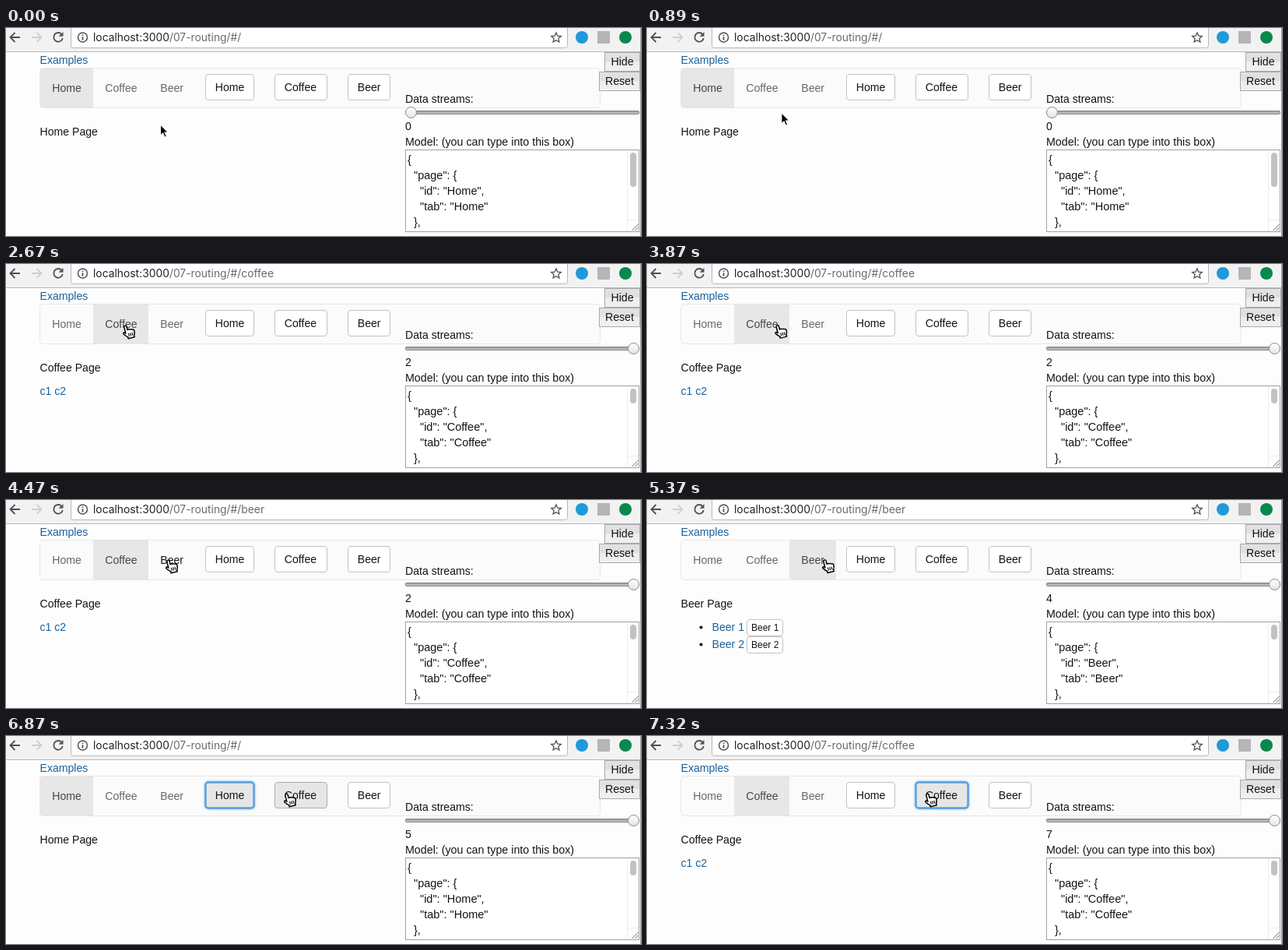
An HTML page for the animation above (8 s loop, 816 px wide and 267 px high).

```html
<!DOCTYPE html>
<html lang="en">
<head>
<meta charset="utf-8">
<title>Routing demo</title>
<style>
  html, body { margin: 0; width: 100%; height: 100%; overflow: hidden; background: #fdfdfd; }
  svg { display: block; font: 14.1px "Liberation Sans", Arial, sans-serif; fill: #141414; }
  text { white-space: pre; }
  .line { fill: none; stroke: #505050; stroke-width: 1.8; }
  .link { fill: #1a629c; }
  .button rect { fill: #fff; stroke: #c2c2c2; }
  .button.hover rect { fill: #e6e6e6; stroke: #adadad; }
  .button.focus rect { fill: #e6e6e6; stroke: #5a9fe0; stroke-width: 2.4; filter: drop-shadow(0 0 1.5px #66afe9); }
  .small { font-size: 12px; }
  .tab rect { fill: none; }
  .tab text { fill: #686868; }
  .tab.hover text { fill: #141414; }
  .tab.active rect { fill: #e7e7e7; }
  .tab.active text { fill: #464646; }
  .native rect { fill: url(#native); stroke: #a9a9a9; }
  .model { font-size: 14.5px; }
</style>
</head>
<body>
<svg width="816" height="267" viewBox="0 0 816 267">
  <defs>
    <linearGradient id="native" x2="0" y2="1">
      <stop stop-color="#e2e2e2"/><stop offset=".48" stop-color="#dfdfdf"/>
      <stop offset=".5" stop-color="#ededed"/><stop offset="1" stop-color="#f0f0f0"/>
    </linearGradient>
    <linearGradient id="track" x2="0" y2="1">
      <stop stop-color="#959595"/><stop offset="1" stop-color="#cfcfcf"/>
    </linearGradient>
    <linearGradient id="knob" x2="0" y2="1">
      <stop stop-color="#fff"/><stop offset="1" stop-color="#e4e4e4"/>
    </linearGradient>
  </defs>

  <!-- browser toolbar -->
  <rect width="816" height="30" fill="#f2f2f2"/>
  <rect x="83.5" y="-5.5" width="638" height="31" rx="3" fill="#fff" stroke="#b8b8b8"/>
  <path d="M0 30.5H816" stroke="#b9b9b9"/>
  <path class="line" d="M18 12H6M11.5 6L5.5 12L11.5 18"/>
  <path class="line" d="M33 12H45M39.5 6L45.5 12L39.5 18" style="stroke:#cfcfcf"/>
  <path class="line" d="M71.5 8A5.8 5.8 0 1 0 72.8 13"/>
  <path d="M73.5 5V10.8H67.7Z" fill="#505050"/>
  <circle class="line" cx="98.5" cy="12" r="6" style="stroke-width:1.5"/>
  <path class="line" d="M98.5 11.3V15.5M98.5 8.4V10"/>
  <text x="112" y="17" font-family="Inter, Roboto, sans-serif" font-size="13.85" fill="#6a6a6a"><tspan fill="#222">localhost:3000</tspan><tspan id="path"></tspan></text>
  <path class="line" style="stroke-width:1.3" d="M707 6L708.8 10.2L713.3 10.6L709.9 13.6L710.9 18L707 15.7L703.1 18L704.1 13.6L700.7 10.6L705.2 10.2Z"/>
  <circle cx="740" cy="12" r="8" fill="#1c9ad9"/>
  <rect x="760" y="4" width="16" height="16" fill="#b5b5b5"/>
  <circle cx="796" cy="12" r="8" fill="#07894c"/>

  <!-- navigation -->
  <text class="link" x="43.5" y="46">Examples</text>
  <rect x="43.5" y="51.5" width="720" height="51" rx="4" fill="#fbfbfb" stroke="#e7e7e7"/>
  <g id="nav"></g>

  <!-- pages -->
  <g id="pages">
    <text x="43.5" y="138">Home Page</text>
    <g><text x="43.5" y="138">Coffee Page</text><text class="link" x="43.5" y="168">c1 c2</text></g>
    <g id="beers"><text x="43.5" y="138">Beer Page</text></g>
  </g>

  <!-- developer panel -->
  <g class="native">
    <rect x="769.5" y="31.5" width="45" height="24"/><text x="777.5" y="48">Hide</text>
    <rect x="762.5" y="56.5" width="52" height="24"/><text x="770" y="73">Reset</text>
  </g>
  <text x="513" y="96">Data streams:</text>
  <rect x="513.5" y="106.5" width="300" height="4" rx="1" fill="url(#track)" stroke="#7c7c7c" stroke-width=".9"/>
  <circle id="thumb" cy="108.5" r="7" fill="url(#knob)" stroke="#8a8a8a"/>
  <text id="count" x="513" y="131"></text>
  <text x="513" y="151" font-size="14.25">Model: (you can type into this box)</text>
  <rect x="513.5" y="156.5" width="300" height="105" fill="#fff" stroke="#a0a0a0"/>
  <path d="M798.5 157V261M799 246.5H813" stroke="#ececec"/>
  <rect id="scroll" x="802" y="160" width="8" rx="4" fill="#c2c2c2"/>
  <path d="M804.5 260L812.5 252M808.5 260L812.5 256" stroke="#666"/>
  <g class="model">
    <text x="516" y="174">{</text>
    <text x="524" y="194">"page": {</text>
    <text id="modelId" x="532" y="214"></text>
    <text id="modelTab" x="532" y="234"></text>
    <text x="524" y="254">},</text>
  </g>
  <path d="M815.5 0V267" stroke="#9a9a9a"/>

  <!-- pointers, with the hot spot at 0,0 -->
  <path id="arrow" d="M0 0V14L3.2 11L5.5 16.3L7.9 15.2L5.6 10.1H10Z" fill="#000" stroke="#fff" stroke-width="1.1"/>
  <g id="hand">
    <g transform="translate(-1.3 -.3) rotate(-14) scale(1.1 1)" stroke="#000" stroke-width="1.4" fill="#fff" stroke-linejoin="round">
      <path d="M-1.5 9.5V1Q-1.5-.5 0-.5T1.5 1V5.5Q3 4.3 4 5.8Q5.8 5 6.5 6.6Q9 6.2 9 8.7Q9 12 7.5 14V16.5H0V14.7Q-2 12.5-4 9.7Q-4.7 8.2-3.5 7.7Q-2.3 7.7-1.5 9.5Z"/>
      <path d="M1.7 10V14M3.8 10V14M5.9 10V14" stroke-width="1"/>
    </g>
  </g>
</svg>
<script>
const LOOP = 8000;
const NAMES = ['Home', 'Coffee', 'Beer'];
const TABS = [[44, 68], [112, 71], [183, 60]];           // x, width
const BUTTONS = [[256.5, 62], [345.5, 67], [439.5, 54]];

const routes = [[0, ''], [2670, 'coffee'], [4470, 'beer'], [5970, ''], [7170, 'coffee']];
const pages = [[0, 0, 0], [2670, 1, 2], [4620, 2, 4], [6120, 0, 5], [7320, 1, 7]]; // time, page, count
const focuses = [[0, -1], [5970, 0], [7170, 1]];
// first step, last step, number of steps, destination
const moves = [
  [150, 1190, 8, 161, 102], [1340, 1780, 4, 154.5, 80], [3870, 4170, 3, 209.5, 78],
  [5370, 5670, 3, 286.5, 77], [6570, 6870, 3, 361.5, 75]
];

const $ = id => document.getElementById(id);
const show = (el, on) => el.style.display = on ? '' : 'none';
const latest = (list, t) => list.filter(entry => entry[0] <= t).pop();
const inside = ([x, w], top, bottom, p) => p.x >= x && p.x < x + w && p.y >= top && p.y < bottom;

const button = (x, y, w, h, label, pad, baseline, cls = '') =>
  `<g class="button ${cls}"><rect x="${x}" y="${y}" width="${w}" height="${h}" rx="3.5"/>` +
  `<text x="${x + pad}" y="${baseline}">${label}</text></g>`;

$('nav').innerHTML =
  TABS.map(([x, w], i) => `<g class="tab"><rect x="${x}" y="52" width="${w}" height="50"/>` +
    `<text x="${x + 15.3}" y="82">${NAMES[i]}</text></g>`).join('') +
  BUTTONS.map(([x, w], i) => button(x, 59.5, w, 33, NAMES[i], 12.3, 81)).join('');

$('beers').innerHTML += [1, 2].map(n => {
  const y = 146 + 22 * n;
  return `<circle cx="69.5" cy="${y - 4.5}" r="2.1"/><text class="link" x="83.5" y="${y}">Beer ${n}</text>` +
    button(128.5, y - 14.5, 46, 21, 'Beer ' + n, 5.5, y, 'small');
}).join('');

const tabs = document.querySelectorAll('.tab');
const buttons = document.querySelectorAll('#nav .button');

function pointerAt(t) {
  const p = { x: 198.5, y: 124 };
  for (const [start, end, steps, x, y] of moves) {
    if (t < start) break;
    const step = Math.floor((t - start) / (end - start) * (steps - 1) + 1e-6) + 1;
    const k = Math.min(1, step / steps), ease = k * k * (3 - 2 * k);
    p.x += (x - p.x) * ease;
    p.y += (y - p.y) * ease;
  }
  return p;
}

function draw(t) {
  const [, page, count] = latest(pages, t);
  const focus = latest(focuses, t)[1];
  const p = pointerAt(t);
  let overLink = false;

  tabs.forEach((tab, i) => {
    const hover = inside(TABS[i], 52, 102, p);
    overLink ||= hover;
    tab.classList.toggle('hover', hover);
    tab.classList.toggle('active', i === page);
  });
  buttons.forEach((el, i) => {
    const hover = inside(BUTTONS[i], 59, 93, p);
    overLink ||= hover;
    el.classList.toggle('hover', hover);
    el.classList.toggle('focus', i === focus);
  });
  [...$('pages').children].forEach((el, i) => show(el, i === page));

  $('path').textContent = '/07-routing/#/' + latest(routes, t)[1];
  $('count').textContent = count;
  $('modelId').textContent = `"id": "${NAMES[page]}",`;
  $('modelTab').textContent = `"tab": "${NAMES[page]}"`;
  $('thumb').setAttribute('cx', count ? 806.5 : 520.5);
  $('scroll').setAttribute('height', count ? 19 : 44);

  for (const id of ['arrow', 'hand']) {
    show($(id), overLink === (id === 'hand'));
    $(id).setAttribute('transform', `translate(${p.x} ${p.y})`);
  }
}

function tick() {
  draw(performance.now() % LOOP);
  requestAnimationFrame(tick);
}
tick();
</script>
</body>
</html>
```
